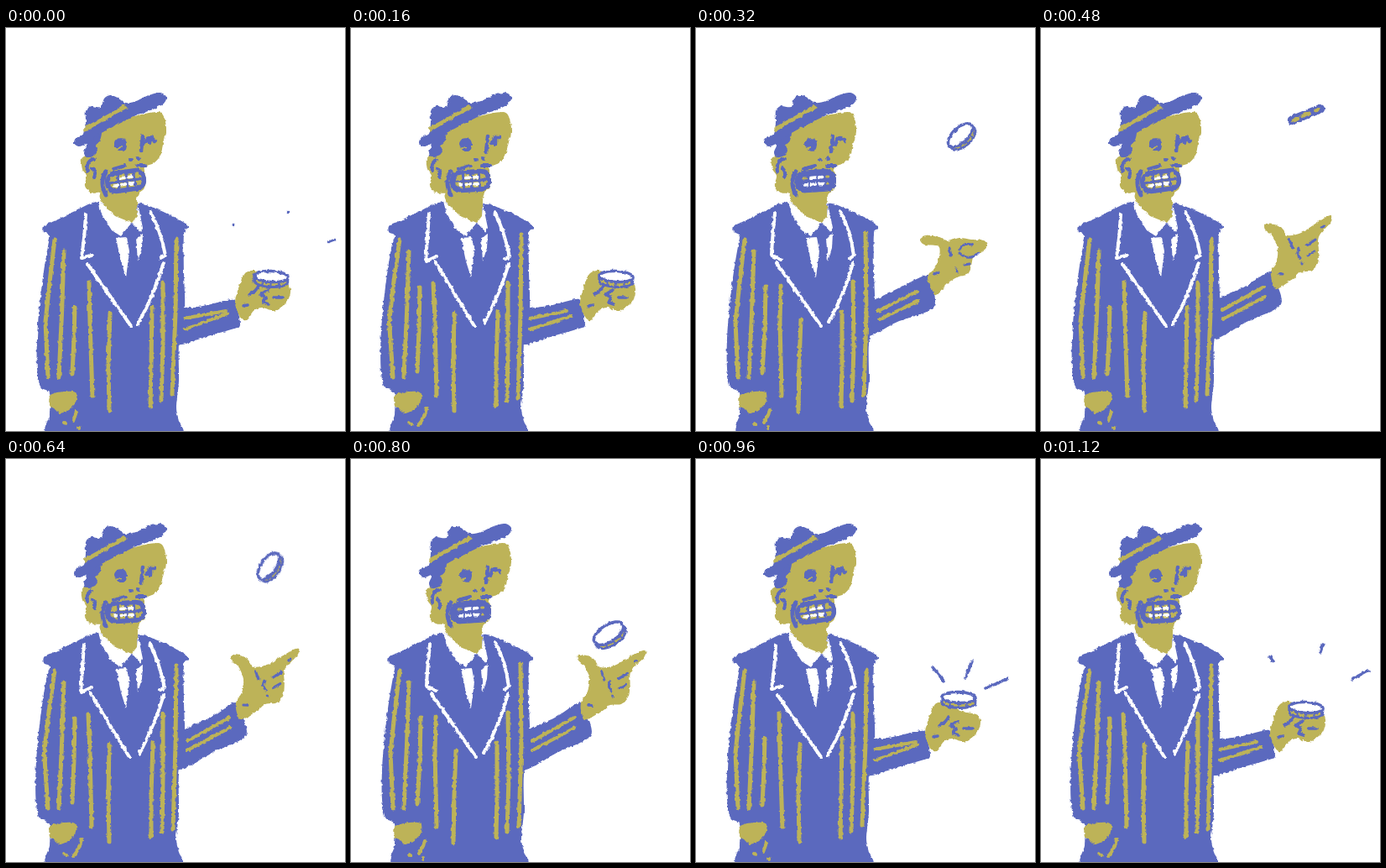
Write an HTML page that moves like this. It is 404 by 480 pixels and loops after 1200 ms.

```html
<!DOCTYPE html>
<html lang="en">
<head>
<meta charset="utf-8">
<title>Coin toss</title>
<style>
html, body { margin: 0; width: 100%; height: 100%; overflow: hidden; background: #fff; }
svg { display: block; width: 100vw; height: 100vh; }
</style>
</head>
<body>
<svg viewBox="0 0 404 480">
  <filter id="rough" filterUnits="userSpaceOnUse" x="0" y="0" width="404" height="490" color-interpolation-filters="sRGB">
    <feTurbulence id="noise" type="fractalNoise" baseFrequency=".22" numOctaves="2"/>
    <feDisplacementMap in="SourceGraphic" scale="3.5" xChannelSelector="R" yChannelSelector="G"/>
  </filter>
  <g id="scene" filter="url(#rough)" stroke-linecap="round" stroke-linejoin="round"></g>
</svg>
<script>
const BLUE = '#5b69be', OLIVE = '#bdb358', WHITE = '#fff';
const STEP = 80, STEPS = 15;
const scene = document.getElementById('scene');
const noise = document.getElementById('noise');

const fill = (color, d) => `<path fill="${color}" d="${d}"/>`;
const line = (color, width, d) => `<path fill="none" stroke="${color}" stroke-width="${width}" d="${d}"/>`;

// Closed Catmull-Rom curve through "x,y x,y ..."
function blob(color, text) {
  const p = text.split(' ').map(s => s.split(',').map(Number)), n = p.length;
  const at = i => p[(i + n) % n];
  let d = 'M' + p[0];
  for (let i = 0; i < n; i++) {
    const [a, b, c, e] = [at(i - 1), at(i), at(i + 1), at(i + 2)];
    d += 'C' + [0, 1].map(k => b[k] + (c[k] - a[k]) / 7) + ' ' +
      [0, 1].map(k => c[k] - (e[k] - b[k]) / 7) + ' ' + c;
  }
  return fill(color, d + 'Z');
}

// Three alternating drawings of the man
const looks = [
  { seed: 3, left: 0, mouthTilt: -8, gums: OLIVE, third: 'M82 333L81 370 79 412',
    lapel: 'M95 222Q94 248 90 274L102 271M97 281L149 355M172 219Q184 240 190 271L184 274M188 279Q178 315 157 353',
    stripes: 'M99 303L100 350 103 438M124 340L122 400 123 456M174 333L173 400 172 451M187 303L187 380 185 443M203 251L202 340 198 436',
    cuff: 'M84 457L80 468M69 470L71 471M87 476V477', ear: 'M106 156Q95 157 97 171',
    eyes: 'M163 129L161 146M166 136Q171 125 177 135M172 131L171 137' },
  { seed: 11, left: 0, mouthTilt: -4, gums: BLUE, third: 'M83 308L82 360 79 410',
    lapel: 'M94 221Q91 248 90 271L101 276M96 280L149 355M172 219Q184 240 188 271L184 274M187 280Q178 315 158 350',
    stripes: 'M101 307L100 350 102 438M125 347L123 400 122 457M174 338L174 400 173 450M187 302L188 380 186 444M202 245L203 340 200 437',
    cuff: 'M88 455L86 461 81 470M69 471L72 473M86 475V477', ear: 'M106 156Q95 157 97 171',
    eyes: 'M163 129L161 147M166 139Q169 126 177 134' },
  { seed: 23, left: -1.5, mouthTilt: -4, gums: OLIVE, third: 'M82 309L81 360 79 409',
    lapel: 'M93 221Q91 250 89 278L102 272M100 278L147 355M171 219Q182 240 189 272L184 275M188 281Q178 315 159 351',
    stripes: 'M98 304L100 350 102 438M123 340L122 400 123 456M175 338L173 400 173 450M187 303L187 380 186 444M203 246L202 340 199 441',
    cuff: 'M90 453Q88 464 81 472M69 470L72 472', ear: 'M102 157Q95 160 97 170',
    eyes: 'M163 129L161 148M168 137L171 130 178 130M172 138L172 133' }
];

const torso = x =>
  blob(BLUE, `110,207 80,219 60,229 46,235 45,243 52,247 ${50 + x},260 ${45 + x},290 ${40 + x},330 ${37 + x},370 ${37 + x},405 ${41 + x},427 52,435 52,460 51,484 130,486 207,484 206,468 203,452 206,420 206,376 213,335 212,290 212,245 217,239 214,233 196,223 178,215 158,209 135,225`);

function body(k) {
  return torso(k.left) +
    line(OLIVE, 5, `M58 252Q${52 + k.left} 300 ${47 + k.left} 350L50 416M69 266Q67 340 63 416${k.third}${k.stripes}`) +
    line(OLIVE, 4, k.cuff) +
    blob(OLIVE, '53,437 52,450 57,453 64,459 74,455 80,450 84,444 83,434 70,433') +
    blob(OLIVE, '112,198 117,211 130,225 150,232 156,224 156,205 158,193 130,185') +
    fill(WHITE, 'M110 206L117 211 130 224 150 232 137 248 126 241 114 222ZM157 209L163 238 160 243 150 232 156 224Z') +
    fill(WHITE, 'M131 250L144 249 147 266 143 297 137 278ZM155 250L163 245 162 262 157 278Z') +
    line(WHITE, 4, k.lapel) +
    fill(BLUE, 'M150 232L162 245 156 251 144 250 138 246Z');
}

function mouth(k) {
  return `<g transform="translate(143 182) rotate(${k.mouthTilt})">
    <rect x="-25" y="-13.5" width="49" height="27" rx="12" fill="${BLUE}"/>
    <rect x="-19" y="-8" width="38" height="16" rx="7" fill="${k.gums}"/>` +
    line(BLUE, 3, 'M-18 0H18M-9 -8V8M1 -8V8M10 -8V8') +
    line(WHITE, 3.5, 'M-6 -4H-1M4 -4H8M-14 4H-11M-6 4H-1M4 4H8') +
    line(OLIVE, 3, 'M-15 -4H-12M13 -4H15M13 4H14') + '</g>';
}

function head(k) {
  return blob(OLIVE, '96,150 90,156 91,168 96,176 94,188 101,196 114,197 128,200 152,198 164,192 167,180 165,166 176,161 184,152 187,139 191,124 189,108 181,100 150,106 115,122') +
    blob(BLUE, '95,132 96,140 93,148 96,154 105,152 109,146 107,140 112,134 113,122') +
    line(BLUE, 4, k.ear + 'M103 167Q108 172 105 178') +
    line(BLUE, 5, 'M119 171Q111 183 119 199') +
    blob(BLUE, '129,138 133,132 141,132 144,138 142,146 134,146') +
    line(OLIVE, 2, 'M131 144L137 142') +
    line(BLUE, 4.5, k.eyes) +
    line(BLUE, 4, 'M148 157H149M157 155L158 156M128 168L142 164M156 164L166 164') +
    mouth(k) +
    blob(BLUE, '81,137 84,130 93,126 95,112 95,99 101,93 113,94 117,84 124,80 133,83 142,89 155,87 170,80 184,77 191,82 188,90 175,97 155,104 135,114 112,126 97,137 87,141') +
    fill(OLIVE, 'M92 119L112 108 130 98 140 91 145 95 130 103 112 113 94 124Z');
}

const arms = {
  hold: look =>
    blob(BLUE, '200,338 214,334 240,330 268,323 274,327 279,353 272,358 240,367 207,377 190,360') +
    line(OLIVE, 4, look ? 'M213 346L257 337M213 359L263 343' : 'M212 346L262 337M213 359L264 340') +
    blob(OLIVE, '273,327 279,304 285,292 297,289 315,300 336,305 339,315 334,327 320,337 306,333 296,336 286,348 279,344') +
    line(BLUE, 3.5, 'M290 317Q298 314 301 307M304 317L312 312M305 318L310 321 307 327 313 329M319 321L329 321M283 331L288 330'),
  open: () =>
    blob(BLUE, '195,330 214,323 245,308 275,294 280,303 283,333 240,350 205,367 190,350') +
    line(OLIVE, 4, 'M217 337L263 314M219 347L265 325') +
    blob(OLIVE, '276,297 285,285 290,272 289,260 272,258 267,252 274,248 290,249 299,254 314,250 328,252 343,253 347,260 340,267 331,271 328,283 324,293 311,297 300,304 286,318 281,311') +
    line(BLUE, 3, 'M302 262L304 271M314 264Q318 255 329 258M314 268Q326 279 337 267M284 293L289 291M310 287L311 290M320 282L326 281'),
  point: (look, turn) =>
    blob(BLUE, '195,332 214,321 243,308 270,291 276,295 286,329 245,350 207,370 190,350') +
    line(OLIVE, 4, 'M216 336L266 308M216 347L267 320') +
    `<g transform="rotate(${turn} 280 290)">` +
    blob(OLIVE, '276,304 274,291 281,277 282,262 276,248 267,240 267,234 277,234 286,238 294,247 310,244 327,233 342,224 347,224 345,232 333,245 330,254 331,265 330,280 322,289 309,291 300,299 281,311') +
    line(BLUE, 3, 'M296 252L300 262M307 263Q304 269 309 274M317 259L327 252M318 271L326 266M283 293H288M311 280V281M335 238L337 236') + '</g>'
};

function coin(x, y, tilt, rx, ry, depth) {
  const rim = `M${-rx} 0V${depth}A${rx} ${ry} 0 0 0 ${rx} ${depth}V0A${rx} ${ry} 0 0 1 ${-rx} 0Z`;
  const bars = [-.5, 0, .5].map(u => {
    const top = ry * Math.sqrt(1 - u * u);
    return `M${u * rx} ${top}V${top + depth}`;
  }).join('');
  return `<g transform="translate(${x} ${y}) rotate(${tilt})">` +
    `<path d="${rim}" fill="${OLIVE}" stroke="${BLUE}" stroke-width="3"/>` + line(BLUE, 2, bars) +
    `<ellipse rx="${rx}" ry="${ry}" fill="${WHITE}" stroke="${BLUE}" stroke-width="3.5"/></g>`;
}

const edgeCoin = (x, y, tilt) =>
  `<g transform="translate(${x} ${y}) rotate(${tilt})">` +
  line(BLUE, 11, 'M-18 0H18') + line(OLIVE, 4, 'M-17 1H-11M-6 0H4M12 0H16') + '</g>';

// Free flight: parabola peaking at step 6
const flightY = n => 103 + 6.67 * (n - 6) ** 2;
const spin = {
  3: [317, -20, 20, 9], 4: [315, -43, 18, 9], 5: [316, -62, 19, 7],
  7: [315, -5, 20, 6], 8: [313, -55, 18, 9], 9: [311, -15, 20, 6],
  10: [307, -33, 20, 10], 11: [311, -12, 20, 7]
};

function coinAt(n) {
  if (n === 6) return edgeCoin(316, 103, -22);
  if (n === 12) return coin(313, 284, 2, 20, 6.5, 6);
  const pose = spin[n];
  if (!pose) return coin(316, 296, 3, 20, 6.5, 6);
  const [x, tilt, rx, ry] = pose;
  return coin(x, flightY(n) - 2, tilt, rx, ry, 5);
}

const sparks = {
  12: 'M282 248L295 264M329 241L321 261M345 273L371 262',
  13: 'M277 242L285 252M333 230L327 246M358 267L381 257',
  14: 'M273 236L277 241M336 221L333 230M371 262L390 252',
  0: 'M271 234V235M336 219V220M384 255L392 252'
};

function armAt(n, look) {
  if (n < 3 || n > 10) return arms.hold(look);
  if (n < 5) return arms.open();
  return arms.point(look, Math.max(0, n - 6));
}

let shown = -1;
function render(ms) {
  const n = Math.floor(ms / STEP) % STEPS;
  if (n === shown) return;
  shown = n;
  const look = n % 3, k = looks[look];
  noise.setAttribute('seed', k.seed);
  scene.innerHTML = armAt(n, look) + body(k) + head(k) + coinAt(n) +
    (sparks[n] ? line(BLUE, n ? 3.5 : 2.5, sparks[n]) : '');
}

let start;
function tick(now) {
  start ??= now;
  render(now - start);
  requestAnimationFrame(tick);
}
render(0);
requestAnimationFrame(tick);
</script>
</body>
</html>
```
